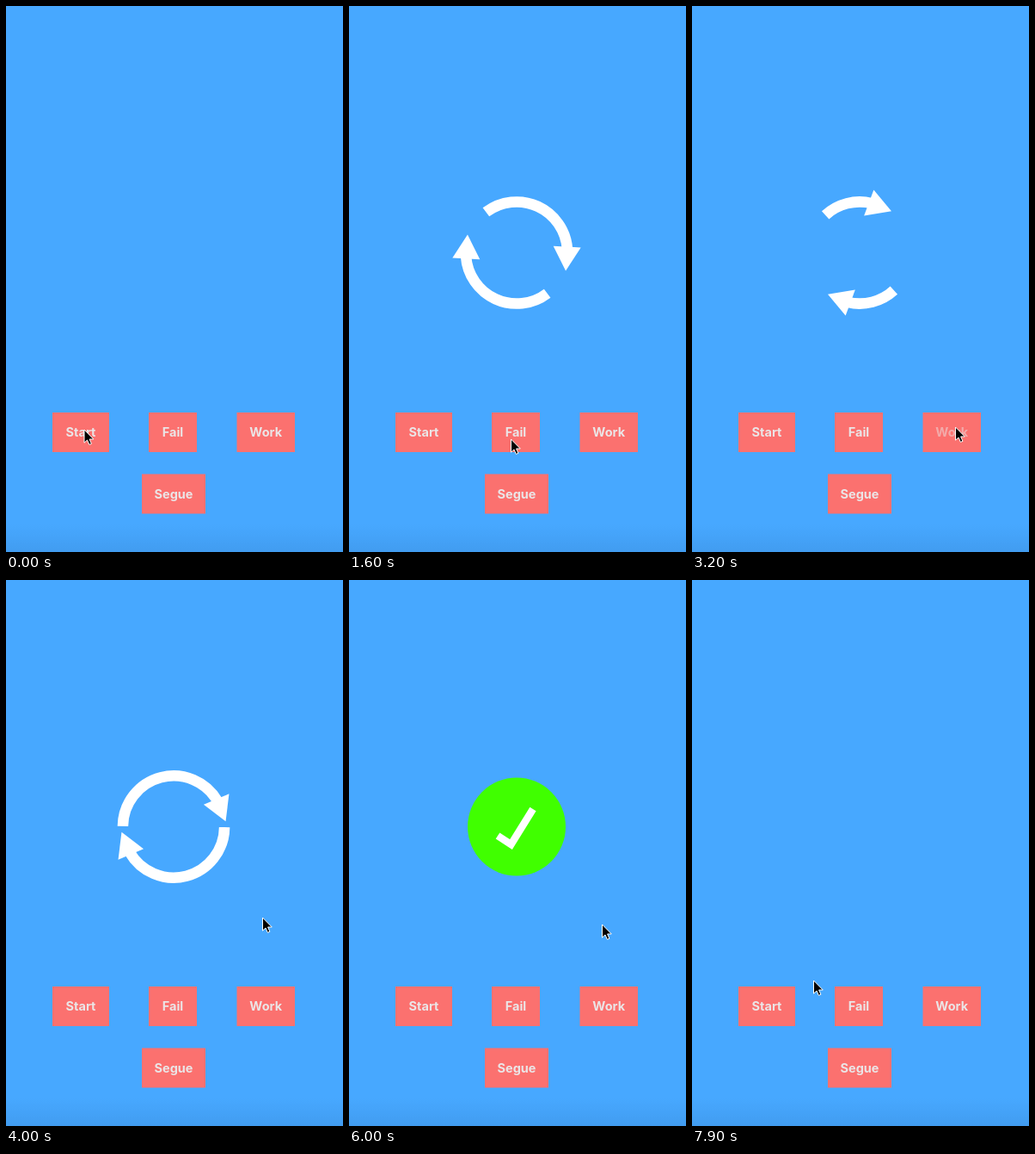
An HTML page that plays this animation: 392x634 px, repeating every 8 s.

```html
<!DOCTYPE html>
<html lang="en">
<head>
<meta charset="utf-8">
<title>Loading indicator</title>
<style>
  html, body { margin: 0; width: 100%; height: 100%; overflow: hidden; background: #47a8ff; }
  svg { display: block; width: 392px; height: 634px; }
  text { font: 700 14.5px Inter, Roboto, sans-serif; fill: #ebe5e6; text-anchor: middle; }
</style>
</head>
<body>
<svg viewBox="0 0 392 634">
  <defs>
    <linearGradient id="shade" x2="0" y2="1">
      <stop offset="0" stop-color="#2a6db5" stop-opacity="0"/>
      <stop offset="1" stop-color="#2a6db5" stop-opacity=".2"/>
    </linearGradient>
  </defs>
  <rect width="392" height="634" fill="#47a8ff"/>
  <rect y="602" width="392" height="32" fill="url(#shade)"/>
  <g id="buttons"></g>
  <g transform="translate(195 286.5)">
    <g id="spinner">
      <g id="arrow">
        <path id="arc" fill="none" stroke="#fff"/>
        <path id="head" d="M-16 0H16L0 28Z" fill="#fff"/>
      </g>
      <use href="#arrow" transform="rotate(180)"/>
    </g>
    <g id="badge">
      <circle id="disc" r="57" fill="#40ff00"/>
      <path id="check" d="M-22 10.5L-6.5 20.5L19 -20.5" pathLength="1" stroke-dasharray="1 2"
            fill="none" stroke="#fff" stroke-width="8.5"/>
    </g>
  </g>
  <path id="cursor" d="M0 0V15.2L3.5 12L5.9 17.4L8.4 16.3L6.1 11H10.8Z"
        fill="#000" stroke="#fff"/>
</svg>
<script>
const LOOP = 8, RADIUS = 59.1;
const el = id => document.getElementById(id);
const set = (id, attrs) => {
  for (const k in attrs) el(id).setAttribute(k, attrs[k]);
};
const clamp = u => Math.min(1, Math.max(0, u));
const ramp = (t, a, b) => clamp((t - a) / (b - a));
const smooth = u => u * u * (3 - 2 * u);

// label, x, y, width, press start, press end
const buttons = [
  ['Start', 54, 472, 66, .1, .3],
  ['Fail', 166, 472, 56],
  ['Work', 268.5, 472, 67.5, 3.05, 3.3],
  ['Segue', 158, 543.5, 74]
];
el('buttons').innerHTML = buttons.map(([label, x, y, w]) =>
  `<rect x="${x}" y="${y}" width="${w}" height="46" fill="#fb716f"/>
   <text id="${label}" x="${x + w / 2}" y="${y + 28.2}">${label}</text>`).join('');

// time, x, y of the pointer tip
const track = [
  [0, 91, 492], [.5, 91, 492], [.9, 78, 495], [1.6, 188.5, 503], [2.05, 94, 500],
  [2.7, 307, 489], [3.3, 306.5, 489], [4, 298.5, 392], [4.6, 294.5, 397], [5.3, 294.5, 397],
  [5.8, 294.5, 400], [7.45, 294.5, 400], [7.85, 141.5, 465], [8, 141.5, 465]
];
function pointer(t) {
  const i = track.findIndex(p => p[0] > t);
  const [t0, x0, y0] = track[i - 1], [t1, x1, y1] = track[i];
  const u = smooth(ramp(t, t0, t1));
  return [x0 + (x1 - x0) * u, y0 + (y1 - y0) * u];
}

const sweep = t => 72 * (1 - Math.cos(Math.PI * (t - .22) / 1.88));

function drawSpinner(t) {
  const on = t >= .2 && t < 5.58;
  set('spinner', { visibility: on ? 'visible' : 'hidden' });
  if (!on) return;
  // the arcs close into a full ring while the heads drop back slightly
  const closing = smooth(ramp(t, 3.3, 4.33));
  const angle = -7 + 292 * (t - 1.6) - 9 * closing;
  const base = sweep(Math.min(t, 3.3));
  const length = base + (180 - base) * closing;
  const at = deg => {
    const a = deg * Math.PI / 180;
    return `${RADIUS * Math.cos(a)} ${RADIUS * Math.sin(a)}`;
  };
  const large = length + 3 > 180 ? 1 : 0;
  set('arc', {
    d: `M${at(angle - length)}A${RADIUS} ${RADIUS} 0 ${large} 1 ${at(angle + 3)}`,
    'stroke-width': 12.5 * (1 - ramp(t, 4.4, 5.58))
  });
  const size = 1 - ramp(t, 5.42, 5.58);
  set('head', { transform: `rotate(${angle}) translate(${RADIUS} 0) rotate(10) scale(${size})` });
}

function drawBadge(t) {
  set('badge', {
    visibility: t > 5.55 && t < 7.3 ? 'visible' : 'hidden',
    opacity: 1 - ramp(t, 7, 7.3)
  });
  set('disc', { r: 57 * smooth(ramp(t, 5.55, 5.8)) });
  const drawn = ramp(t, 5.75, 5.97);
  set('check', { 'stroke-dashoffset': 1 - drawn, opacity: drawn > 0 ? 1 : 0 });
}

function frame(now) {
  const t = now / 1000 % LOOP;
  drawSpinner(t);
  drawBadge(t);
  for (const [label, , , , from, to] of buttons)
    set(label, { opacity: t >= from && t < to ? .5 : 1 });
  set('cursor', { transform: `translate(${pointer(t)})` });
  requestAnimationFrame(frame);
}
frame(0);
</script>
</body>
</html>
```
